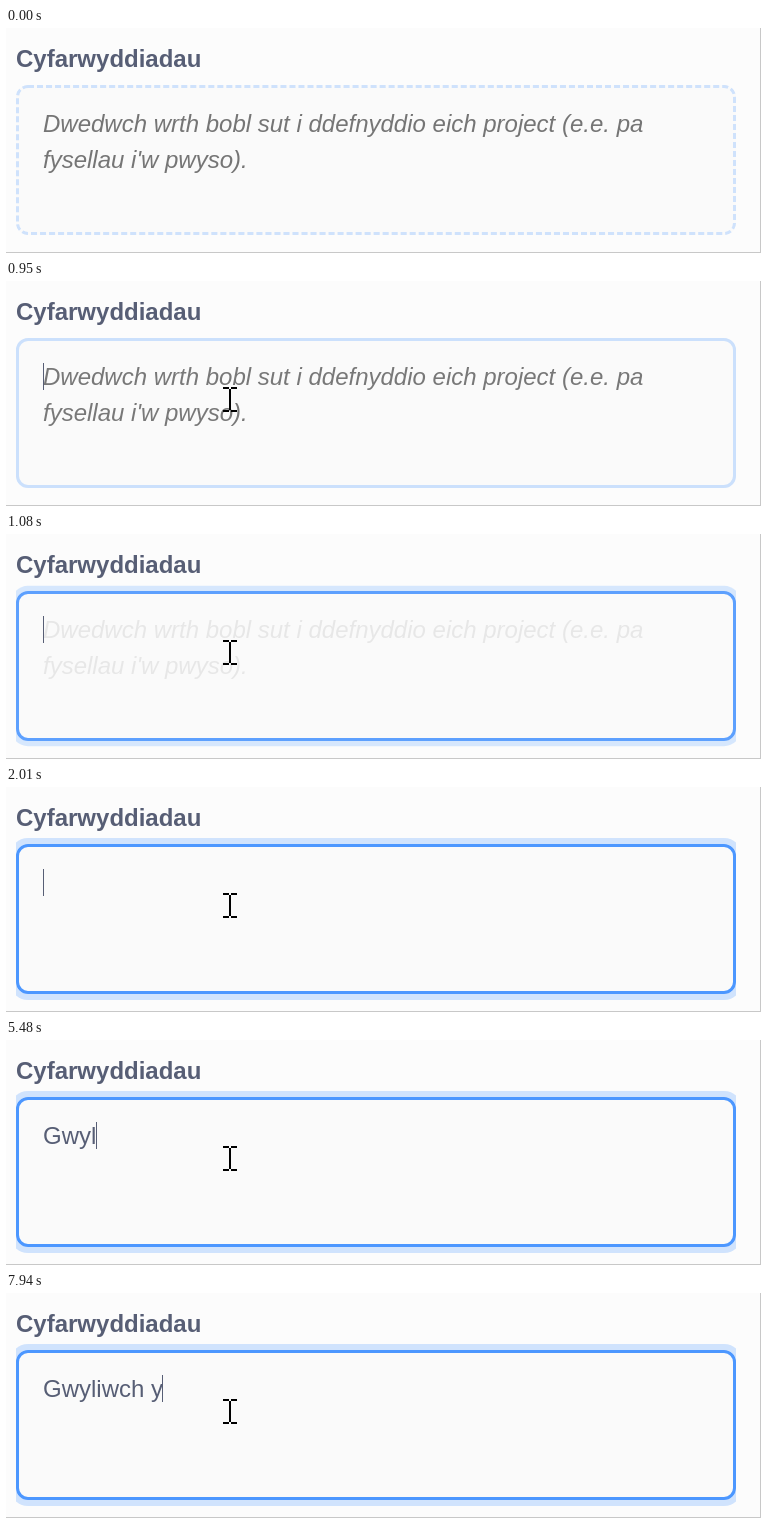
An HTML page that plays this animation: 755 by 225 pixels, repeating every 8000 ms.

```html
<!DOCTYPE html>
<html lang="cy">
<head>
<meta charset="utf-8">
<title>Cyfarwyddiadau</title>
<style>
  html, body { margin: 0; width: 100%; height: 100%; overflow: hidden; }
  body {
    position: relative;
    background: #fcfcfc;
    color: #575e75;
    font: 24px/36px "Liberation Sans", Arial, sans-serif;
  }
  .page {
    position: absolute;
    left: 0; top: 0;
    width: 755px; height: 225px;
    box-sizing: border-box;
    border: solid #c8c8c8;
    border-width: 0 1px 1px 0;
    overflow: hidden;
  }
  .page > * { position: absolute; }
  h1 { left: 10px; top: 13px; margin: 0; font: inherit; font-weight: bold; }
  .clip { left: 10px; top: 57px; width: 720px; height: 150px; clip-path: inset(-12px 0); }
  .field {
    --p: 0;
    height: 100%;
    border-radius: 12px;
    background: #fafafa;
    box-shadow: 0 0 0 calc(6px * var(--p)) rgba(76, 151, 255, calc(.25 * var(--p)));
  }
  .field svg { display: block; }
  .field rect {
    fill: none;
    stroke: rgba(76, 151, 255, calc(.25 + .75 * var(--p)));
    stroke-width: 3;
    stroke-dasharray: 6 3.016;
  }
  .field.focus rect { stroke-dasharray: none; }
  .hint, .typed { left: 37px; top: 78px; white-space: pre; }
  .hint { color: #757575; font-style: italic; }
  .caret { left: 37px; top: 82px; width: 1px; height: 27px; background: #575e75; }
  .pointer { left: 0; top: 0; }
</style>
</head>
<body>
<div class="page">
  <h1>Cyfarwyddiadau</h1>
  <div class="clip">
    <div class="field">
      <svg width="720" height="150"><rect x="1.5" y="1.5" width="717" height="147" rx="10.5"/></svg>
    </div>
  </div>
  <div class="hint">Dwedwch wrth bobl sut i ddefnyddio eich project (e.e. pa
fysellau i'w pwyso).</div>
  <div class="typed"></div>
  <div class="caret"></div>
  <svg class="pointer" width="14" height="25">
    <path d="M0 0h6v2h2v-2h6v2h-6v21h6v2h-6v-2h-2v2h-6v-2h6v-21h-6z"/>
  </svg>
</div>
<script>
  const LOOP = 8000;
  const TICK = 1000 / 15;   // movement is shown at 15 steps a second
  const BLINK = 530;
  const ENTER = 70, ARRIVE = 550, FOCUS = 950;
  const TEXT = "Gwyliwch y";
  const KEY_TIMES = [2210, 2830, 4420, 5480, 5880, 6080, 6480, 6680, 7410, 7940];

  const [field, hint, typed, caret, pointer] =
    ["field", "hint", "typed", "caret", "pointer"].map(c => document.querySelector("." + c));

  const clamp = x => Math.min(1, Math.max(0, x));
  const smooth = x => x * x * (3 - 2 * x);
  const mix = (a, b, k) => Math.round(a + (b - a) * k);

  function drawPointer(t) {
    const k = clamp(Math.floor((t - ENTER) / (ARRIVE - ENTER) * 7 + .01) / 7);
    const eased = 1 - (1 - k) ** 2;
    pointer.style.visibility = t < ENTER ? "hidden" : "visible";
    pointer.style.transform = `translate(${mix(435, 217, eased)}px, ${mix(208, 106, eased)}px)`;
  }

  function drawField(t) {
    const since = Math.floor((t - FOCUS + 4) / TICK) * TICK;
    const p = t < FOCUS ? 0 : smooth(clamp((since + 20) / 200));
    field.classList.toggle("focus", t >= FOCUS);
    field.style.setProperty("--p", p);
    hint.style.opacity = 1 - p;
  }

  function drawTyping(t) {
    const pressed = KEY_TIMES.filter(time => time <= t);
    typed.textContent = TEXT.slice(0, pressed.length);

    // The caret sits on the last pixel of the text; each key restarts its blink
    const x = Math.max(0, Math.floor(typed.getBoundingClientRect().width - .2));
    const idle = t - (pressed.at(-1) ?? FOCUS);
    const on = idle >= 0 && Math.floor(idle / BLINK) % 2 === 0;
    caret.style.transform = `translateX(${x}px)`;
    caret.style.visibility = on ? "visible" : "hidden";
  }

  function draw() {
    const t = performance.now() % LOOP;
    drawPointer(t);
    drawField(t);
    drawTyping(t);
    requestAnimationFrame(draw);
  }
  draw();
</script>
</body>
</html>
```
